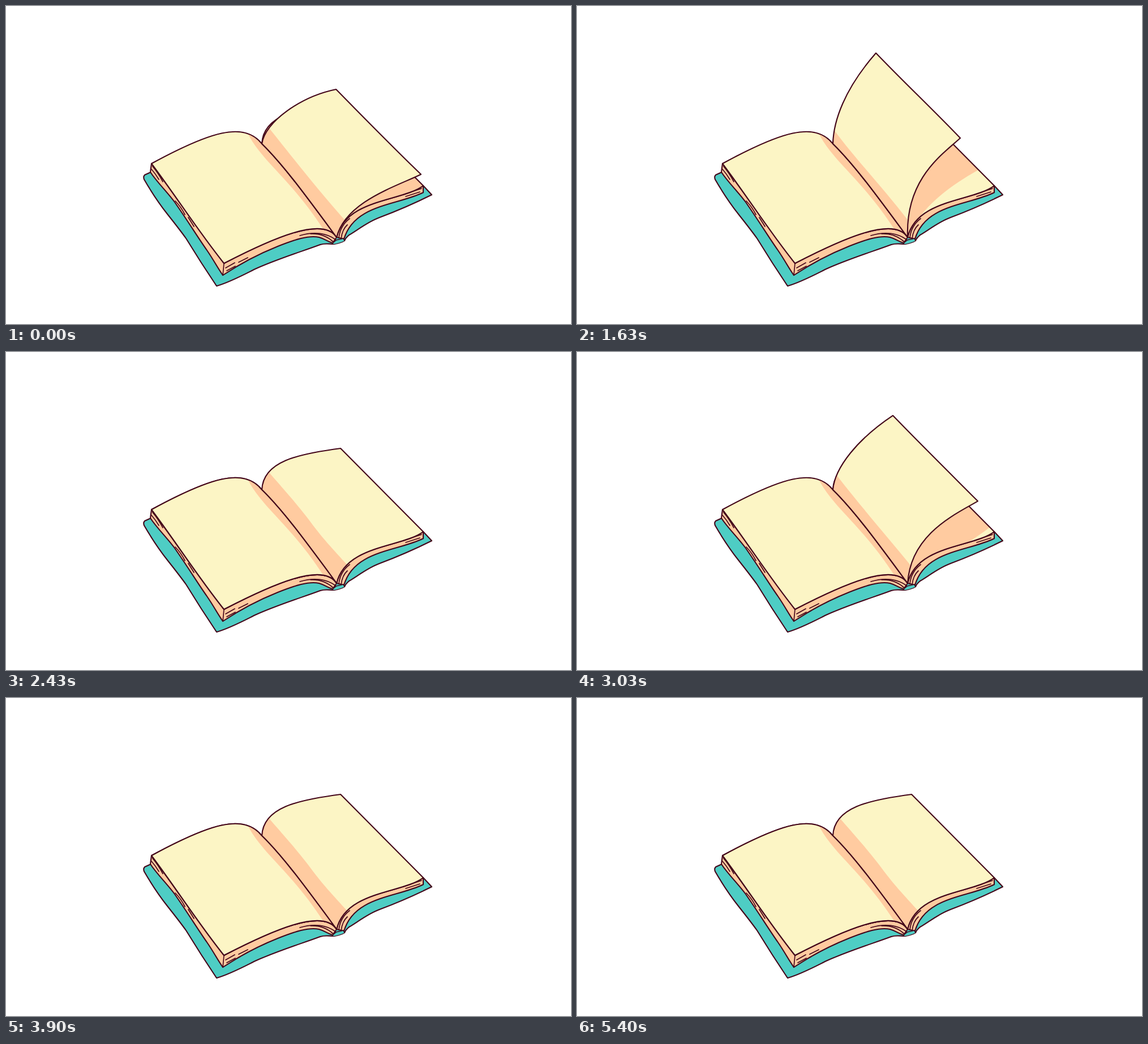
An HTML page for the animation above (5.83 s loop, 998 by 561 pixels).

```html
<!DOCTYPE html>
<html lang="en">
<head>
<meta charset="utf-8">
<title>Book turning its pages</title>
<style>
  html, body { margin: 0; width: 100%; height: 100%; overflow: hidden; background: #fff; }
  svg { display: block; width: 100%; height: 100%; }
  .line { fill: none; stroke: #43061a; stroke-width: 2.1; stroke-linecap: round; stroke-linejoin: round; }
  .thin { stroke-width: 1.7; }
  .teal { fill: #4ecdc4; }
  .cream { fill: #fcf5c5; }
  .peach { fill: #ffcba0; }
</style>
</head>
<body>
<svg viewBox="0 0 998 561">
  <defs>
    <path id="cover" d="M256 293 L245 298 Q242 301 244 306 C255 325 270 348 285 367 C300 386 308 396 318 410 L345 453 L372 494
      C396 487 420 474 440 464 C480 446 520 434 555 421 C564 418 570 420 580 420 Q592 418 598 414 Q600 409 606 404
      C620 396 640 380 660 373 C692 361 724 347 752 333 L737 317 L600 340 Z"/>
    <path id="leftBlock" d="M257 278 L255 293 C266 310 284 327 298 346 C325 385 340 410 355 431 C366 447 374 462 383 475
      C410 457 440 440 480 424 C510 412 535 404 553 408 C564 411 568 416 577 418 L584 408 C560 370 470 410 385 454 Z"/>
    <path id="rightBlock" d="M737 317 L737 329 C690 352 615 350 597 411 L584 408 C600 340 700 345 737 317 Z"/>
    <path id="leftPage" d="M452 243 C420 203 360 222 257 278 C300 335 340 398 385 454 C470 410 560 370 584 408 C530 335 490 280 452 243 Z"/>
    <path id="rightPage" d="M452 243 C454 193 515 180 591 170 L737 317 C700 345 600 340 584 408 C530 335 490 280 452 243 Z"/>
    <path id="sheet"/>
    <clipPath id="inLeft"><use href="#leftPage"/></clipPath>
    <clipPath id="inRight"><use href="#rightPage"/></clipPath>
    <clipPath id="inSheet"><use href="#sheet"/></clipPath>
  </defs>

  <use href="#cover" class="teal"/>
  <use href="#cover" class="line"/>
  <use href="#leftBlock" class="peach"/>
  <use href="#leftBlock" class="line"/>
  <use href="#rightBlock" class="peach"/>
  <use href="#rightBlock" class="line"/>
  <path class="teal" d="M577 418 L583 413 L596 410 L598 414 Q590 418 579 420 Z"/>
  <path class="line thin" d="M577 418 L583 413 L596 410 L598 414"/>

  <use href="#leftPage" class="cream"/>
  <path id="leftShade" class="peach" clip-path="url(#inLeft)"/>
  <use href="#leftPage" class="line"/>
  <use href="#rightPage" class="cream"/>
  <path id="rightShade" class="peach" clip-path="url(#inRight)"/>
  <use href="#rightPage" class="line"/>

  <path class="line thin" d="M385 454 L383 475 M388 462 L404 453 M390 467 L405 459 M411 452 L427 444
    M259 283 Q269 295 277 310 M257 288 Q264 296 270 306 M299 344 Q309 354 316 368 M322 373 L332 389
    M519 405 C545 397 567 401 582 412 M538 402 C556 401 568 407 578 416
    M734 322 Q718 327 702 333 M731 328 L706 336
    M607 375 Q590 388 588 409 M603 386 Q594 394 592 410"/>

  <use href="#sheet" class="cream"/>
  <path id="sheetShade" class="peach" clip-path="url(#inSheet)"/>
  <use href="#sheet" class="line"/>
</svg>

<script>
const LOOP = 5830;      // ms
const TURN = 1470;      // one page turn with its rest
const POSE = 80;        // each drawing is held this long
const TICK = 100 / 3;   // drawings only change on this grid
const LAST = 13;        // the sheet lies flat on the left

const SPINE = "C530 335 490 280 452 243 Z";

// Each track: the steps of its key poses, their paths, and a fixed ending.
const tracks = {
  sheet: {
    at: [1, 3, 5, 6, 9, LAST],
    keys: [
      "M452 243 C457 205 520 160 583 147 C633 198 683 249 733 297 C690 318 600 345 584 408",
      "M452 243 C453 203 472 147 528 83 C577 134 627 181 677 233 C645 262 580 305 584 408",
      "M452 243 C445 205 433 130 434 66 C480 112 532 151 574 199 C569 270 568 340 584 408",
      "M452 243 C430 190 392 140 396 79 C436 123 480 167 516 212 C512 268 540 310 584 408",
      "M452 243 C408 186 316 205 283 178 C312 225 355 280 388 320 C430 368 515 332 584 408",
      "M452 243 C420 203 360 222 257 278 C300 335 340 398 385 454 C470 410 560 370 584 408"
    ],
    end: SPINE
  },
  sheetShade: {
    at: [1, 3, 5, 6, 9, LAST],
    keys: [
      "M461 211 C497 255 545 318 604 384",
      "M452 216 C490 268 530 308 588 382",
      "M443 206 C465 240 520 295 577 366",
      "M428 184 C450 225 495 262 543 317",
      "M386 197 C415 240 470 305 528 371",
      "M423 217 C450 275 500 300 562 396"
    ],
    end: "L584 408 " + SPINE
  },
  rightShade: {
    at: [1, 3, 5, 6, 9],
    keys: [
      "M600 150 C680 180 760 260 760 310 C760 340 700 370 600 420",
      "M600 150 C660 180 730 240 725 280 C680 305 630 335 600 380",
      "M568 168 C600 195 640 228 639 245 C637 270 607 315 604 376",
      "M500 222 C540 250 568 270 569 300 C571 340 577 352 602 378",
      "M466 214 C500 253 515 270 532 292 C560 330 575 345 605 378"
    ],
    end: "L584 412 L440 243 L440 150 Z"
  },
  leftShade: {
    at: [6, 9, LAST],
    keys: [
      "M423 217 C450 275 500 300 562 396",
      "M400 260 C405 350 425 372 522 402",
      "M340 240 C345 340 385 400 460 425"
    ],
    end: "L590 412 L460 220 Z"
  }
};

for (const [id, track] of Object.entries(tracks)) {
  track.node = document.getElementById(id);
  track.values = track.keys.map(d => d.match(/\d+/g).map(Number));
}

// Smooth curve through unevenly spaced keys.
function spline(at, value, x) {
  const end = at.length - 1;
  x = Math.min(at[end], Math.max(at[0], x));
  let i = 0;
  while (i < end - 1 && x >= at[i + 1]) i++;
  const slope = k => {
    const a = Math.max(0, k - 1), b = Math.min(end, k + 1);
    return (value(b) - value(a)) / (at[b] - at[a]);
  };
  const h = at[i + 1] - at[i], u = (x - at[i]) / h, v = 1 - u;
  return v * v * (1 + 2 * u) * value(i) + u * u * (1 + 2 * v) * value(i + 1)
    + h * u * v * (v * slope(i) - u * slope(i + 1));
}

function pathAt({ at, keys, values, end }, step) {
  let n = 0;
  const d = keys[0].replace(/\d+/g, () => {
    const j = n++;
    return spline(at, k => values[k][j], step).toFixed(1);
  });
  return d + " " + end;
}

function stepAt(ms) {
  const tick = Math.floor((ms % LOOP + 4) / TICK);
  const inTurn = (tick * 100 / 3) % TURN;
  return Math.min(LAST, 1 + Math.floor(inTurn / POSE + 1e-6));
}

let shown = 0;
function draw(ms) {
  const step = stepAt(ms);
  if (step === shown) return;
  shown = step;
  for (const track of Object.values(tracks)) track.node.setAttribute("d", pathAt(track, step));
}

function loop() {
  draw(performance.now());
  requestAnimationFrame(loop);
}
loop();
</script>
</body>
</html>
```
